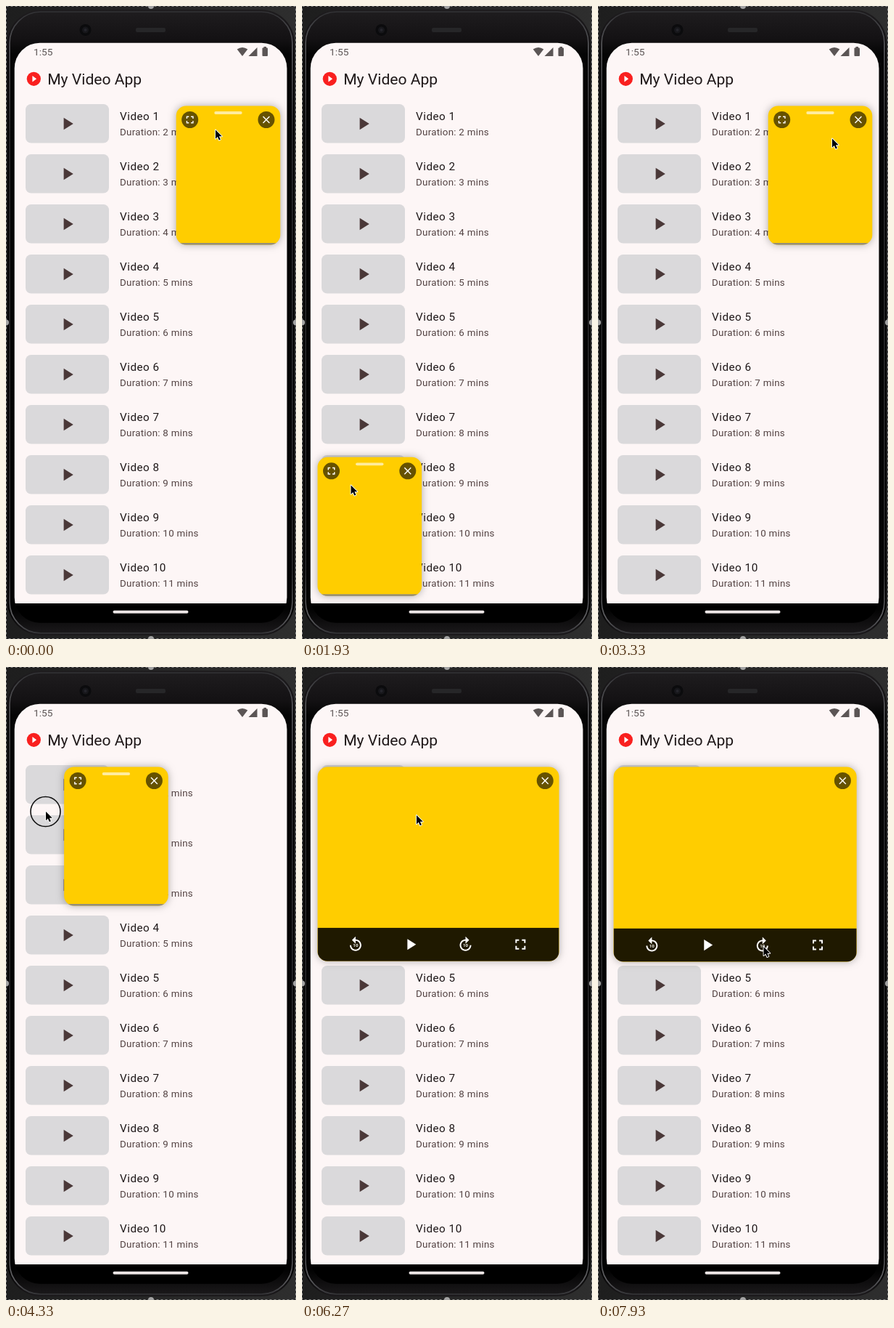
Write an HTML page with a canvas that moves like this. It is 400 px wide and 871 px high and loops after 8000 ms.

```html
<!DOCTYPE html>
<html lang="en">
<head>
<meta charset="utf-8">
<title>Floating video player</title>
<style>
  html, body { margin: 0; width: 100%; height: 100%; overflow: hidden; background: #000; }
  canvas { display: block; width: 400px; height: 871px; }
</style>
</head>
<body>
<canvas id="stage"></canvas>
<script>
const W = 400, H = 871, LOOP = 8000;
const canvas = document.getElementById('stage');
const ctx = canvas.getContext('2d');
const dpr = window.devicePixelRatio || 1;
canvas.width = Math.round(W * dpr);
canvas.height = Math.round(H * dpr);

const SURFACE = '#fdf6f6', INK = '#1f1819', MUTED = '#534343', YELLOW = '#ffcd00';
const STATUS = '#5b5555';

// Icons on a 24 unit grid
const ICONS = {
  play: new Path2D('M8 5v14l11-7z'),
  close: new Path2D('M19 6.4L17.6 5 12 10.6 6.4 5 5 6.4 10.6 12 5 17.6 6.4 19 12 13.4 17.6 19 19 17.6 13.4 12z'),
  expand: new Path2D('M7 14H5v5h5v-2H7zM5 10h2V7h3V5H5zM17 17h-3v2h5v-5h-2zM14 5v2h3v3h2V5z'),
  replay: new Path2D('M12 5V1L7 6l5 5V7c3.3 0 6 2.7 6 6s-2.7 6-6 6-6-2.7-6-6H4c0 4.4 3.6 8 8 8s8-3.6 8-8-3.6-8-8-8z')
};
const ARROW = new Path2D('M0 0V12.2L2.8 9.6 4.8 14.1 6.9 13.2 4.9 8.8H8.8z');

// Keyframes: time, x, y
const PLAYER = [
  [500, 234.7, 137.5], [1400, 21.5, 620.8], [2200, 21.5, 620.8],
  [3050, 234.7, 137.5], [3900, 234.7, 137.5], [4630, 21.5, 137.5]
];
const CURSOR = [
  [450, 289, 170.5], [1250, 67.5, 659.5], [2150, 67.5, 659.5], [2900, 323, 182.5],
  [3800, 323, 182.5], [4230, 55, 199], [4400, 55, 199], [5250, 138.7, 195],
  [5530, 138.7, 195], [6270, 158, 204], [6500, 158, 204], [7300, 228.5, 385]
];
const PRESSES = [[400, 1260], [2100, 2910], [3750, 4400], [5280, 5480]];
const GROW = { start: 5309, length: 1240 };

const clamp = v => Math.max(0, Math.min(1, v));
const mix = (a, b, p) => a + (b - a) * p;
const easeInOut = u => u < .5 ? 4 * u ** 3 : 1 - (2 - 2 * u) ** 3 / 2;
const easeOut = u => 1 - (1 - u) ** 3;

function track(keys, t) {
  if (t <= keys[0][0]) return keys[0].slice(1);
  for (let i = 1; i < keys.length; i++) {
    const a = keys[i - 1], b = keys[i];
    if (t < b[0]) {
      const p = easeInOut((t - a[0]) / (b[0] - a[0]));
      return [mix(a[1], b[1], p), mix(a[2], b[2], p)];
    }
  }
  return keys[keys.length - 1].slice(1);
}

function gradient(x0, y0, x1, y1, ...stops) {
  const g = ctx.createLinearGradient(x0, y0, x1, y1);
  stops.forEach(([at, color]) => g.addColorStop(at, color));
  return g;
}

function roundPath(x, y, w, h, r) {
  ctx.beginPath();
  ctx.roundRect(x, y, w, h, r);
}

function fillRound(x, y, w, h, r, color) {
  ctx.fillStyle = color;
  roundPath(x, y, w, h, r);
  ctx.fill();
}

function disc(x, y, r, color) {
  ctx.fillStyle = color;
  ctx.beginPath();
  ctx.arc(x, y, r, 0, Math.PI * 2);
  ctx.fill();
}

function poly(color, points) {
  ctx.fillStyle = color;
  ctx.beginPath();
  points.forEach(([x, y]) => ctx.lineTo(x, y));
  ctx.fill();
}

function icon(name, x, y, size, color, flip = 1) {
  ctx.save();
  ctx.translate(x, y);
  ctx.scale(size / 24 * flip, size / 24);
  ctx.translate(-12, -12);
  ctx.fillStyle = color;
  ctx.fill(ICONS[name]);
  ctx.restore();
}

function text(str, x, y, size, color, spacing = 0, weight = 400) {
  ctx.font = `${weight} ${size}px Roboto, sans-serif`;
  ctx.letterSpacing = spacing + 'px';
  ctx.fillStyle = color;
  ctx.fillText(str, x, y);
}

function drawPhone() {
  ctx.fillStyle = gradient(0, 0, W, 0, [0, '#1e1e1e'], [1, '#2e2e2e']);
  ctx.fillRect(0, 0, W, H);

  const body = gradient(0, 6, 0, 865,
    [0, '#1f1d1f'], [.045, '#141214'], [.07, '#050505'], [.96, '#030303'], [1, '#1c1a1c']);
  fillRound(2, 5, 396, 861, 46, body);
  ctx.strokeStyle = gradient(0, 5, 0, 866,
    [0, '#303033'], [.06, '#59595c'], [.2, '#29292b'], [.9, '#29292b'], [.97, '#626265'], [1, '#303033']);
  ctx.lineWidth = 1.6;
  roundPath(5, 8, 390, 855, 43);
  ctx.stroke();

  disc(109.5, 33, 8, '#0b0b0d');
  disc(109.5, 33, 4.5, '#17171b');
  disc(109.5, 33, 2, '#25252b');
  fillRound(179, 30, 41, 6, 2, '#262628');

  ctx.strokeStyle = '#8a8a8a';
  ctx.lineWidth = 1;
  ctx.setLineDash([3, 3]);
  ctx.strokeRect(.5, .5, W - 1, H - 1);
  ctx.setLineDash([]);
  [[200, 0], [0, 435.5], [400, 435.5], [200, 871]].forEach(([x, y]) => disc(x, y, 4, '#a3a3a3'));
}

function drawStatus() {
  text('1:55', 38, 68, 13.7, STATUS);
  ctx.fillStyle = STATUS;
  ctx.beginPath();
  ctx.moveTo(326, 69);
  ctx.lineTo(318.7, 59.5);
  ctx.quadraticCurveTo(326, 54.5, 333.3, 59.5);
  ctx.fill();
  poly(STATUS, [[334.5, 69], [346.5, 69], [346.5, 57]]);
  fillRound(353.5, 57.5, 7.5, 11.5, 1, STATUS);
  ctx.fillRect(355.5, 56, 3.5, 2);
}

function drawApp() {
  ctx.save();
  roundPath(11.7, 50.7, 375.8, 798, 35);
  ctx.clip();
  ctx.fillStyle = '#000';
  ctx.fillRect(0, 0, W, H);
  ctx.fillStyle = SURFACE;
  ctx.fillRect(0, 50, W, 772);
  ctx.restore();

  drawStatus();
  disc(38.3, 100.3, 9.6, '#f9201f');
  poly('#fff', [[36.4, 96], [36.4, 104.6], [42.1, 100.3]]);
  text('My Video App', 57.2, 107.6, 21.1, INK);

  for (let i = 0; i < 10; i++) {
    const y = 135 + i * 69;
    fillRound(27, y, 115, 53.6, 7.6, '#dad9db');
    icon('play', 84.4, y + 27, 28.7, '#4a3838');
    text(`Video ${i + 1}`, 157, y + 22, 15.3, INK, .48);
    text(`Duration: ${i + 2} mins`, 157, y + 43, 13.4, MUTED, .24);
  }
  fillRound(147.5, 831.7, 104, 4, 2, '#ece5e5');
}

function roundButton(name, x, y) {
  disc(x, y, 11.5, 'rgba(0,0,0,.6)');
  icon(name, x, y, 17, '#fff');
}

function skipButton(x, y, flip) {
  icon('replay', x, y, 24, '#fff', flip);
  ctx.textAlign = 'center';
  text('10', x, y + 3.6, 6.2, '#fff', 0, 700);
  ctx.textAlign = 'left';
}

function drawControls(x, y, w, h) {
  const top = y + h - 45.7, mid = top + 22.8;
  ctx.fillStyle = '#1f1900';
  ctx.fillRect(x, top, w, 46);
  const gap = (w - 184) / 5;
  const at = i => x + gap * (i + 1) + 46 * i + 22.6;
  skipButton(at(0), mid, 1);
  icon('play', at(1), mid, 26, '#fff');
  skipButton(at(2), mid, -1);
  icon('expand', at(3), mid, 24, '#fff');
}

function drawPlayer(t) {
  const [x, y] = track(PLAYER, t);
  const p = easeOut(clamp((t - GROW.start) / GROW.length));
  const w = mix(143.6, 335.2, p), h = mix(191, 268, p);
  const full = p > .7;

  ctx.save();
  ctx.shadowColor = 'rgba(0,0,0,.32)';
  ctx.shadowBlur = 11 * dpr;
  fillRound(x, y, w, h, 13.5, YELLOW);
  ctx.restore();

  ctx.save();
  roundPath(x, y, w, h, 13.5);
  ctx.clip();
  if (full) {
    drawControls(x, y, w, h);
  } else {
    ctx.fillStyle = '#8f8b80';
    ctx.fillRect(x, y + h - 2.4, w, 3);
    fillRound(x + w / 2 - 19.2, y + 7.6, 38.4, 3.8, 1.9, 'rgba(255,255,255,.62)');
    roundButton('expand', x + 19, y + 19);
  }
  roundButton('close', x + w - 19.3, y + 19);
  ctx.restore();
}

function drawCursor(t) {
  const [x, y] = track(CURSOR, t);
  if (PRESSES.some(([a, b]) => t >= a && t < b)) {
    ctx.strokeStyle = '#111';
    ctx.lineWidth = 1.6;
    ctx.beginPath();
    ctx.arc(x - .5, y, 20.5, 0, Math.PI * 2);
    ctx.stroke();
  }
  ctx.save();
  ctx.translate(x, y);
  ctx.lineJoin = 'round';
  ctx.strokeStyle = '#fff';
  ctx.lineWidth = 1.8;
  ctx.stroke(ARROW);
  ctx.fillStyle = '#000';
  ctx.fill(ARROW);
  ctx.restore();
}

function frame() {
  const t = performance.now() % LOOP;
  ctx.setTransform(dpr, 0, 0, dpr, 0, 0);
  drawPhone();
  drawApp();
  drawPlayer(t);
  drawCursor(t);
  requestAnimationFrame(frame);
}
frame();
</script>
</body>
</html>
```
